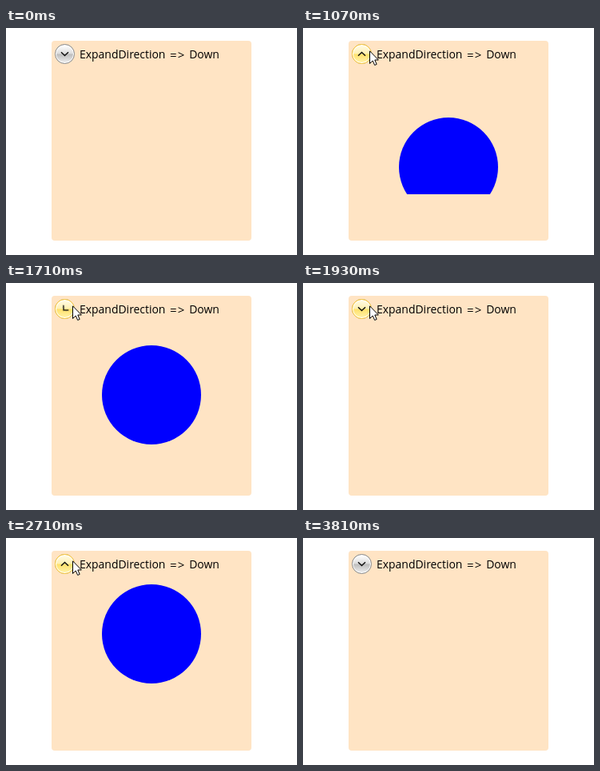
These frames come from a looping animation (364x284 px, 4.32 s). An HTML page:

```html
<!DOCTYPE html>
<html lang="en">
<head>
<meta charset="utf-8">
<title>Expander</title>
<style>
  :root { --loop: 4320ms linear infinite both; }
  html, body { margin: 0; width: 100%; height: 100%; overflow: hidden; background: #fff; }
  .stage { position: relative; width: 364px; height: 284px; overflow: hidden; }
  .panel {
    position: absolute; left: 57px; top: 16px; width: 250px; height: 250px;
    border-radius: 4px; background: #ffe4c4;
  }
  .view {
    position: absolute; left: 120px; width: 124px; overflow: hidden;
    animation: expand var(--loop);
  }
  .ball { width: 124px; height: 124px; border-radius: 50%; background: #00f; }
  svg { position: absolute; left: 0; top: 0; }
  text { font-family: "Open Sans", "Noto Sans", sans-serif; font-size: 13.95px; }
  .arrow { font-size: 15px; }
  .hover { animation: hover var(--loop); }
  .chevron { transform-origin: 73.5px 32.5px; animation: turn var(--loop); }
  .press { animation: press 4320ms step-end infinite both; }
  .cursor { animation: move var(--loop), show 4320ms step-end infinite both; }

  /* The view shrinks towards its middle; the ball stays at its top edge. */
  @keyframes expand {
    0% { top: 160px; height: 0; }
    18.403% { top: 160px; height: 0; animation-timing-function: cubic-bezier(.333, 0, .667, .167); }
    27.083% { top: 58px; height: 204px; }
    35.648% { top: 58px; height: 204px; animation-timing-function: cubic-bezier(.333, 0, .667, .333); }
    44.56% { top: 160px; height: 0; }
    54.051% { top: 160px; height: 0; animation-timing-function: cubic-bezier(.333, 0, .667, .167); }
    62.731% { top: 58px; height: 204px; }
    72.014% { top: 58px; height: 204px; animation-timing-function: cubic-bezier(.333, 0, .667, .333); }
    80.926%, 100% { top: 160px; height: 0; }
  }
  @keyframes turn {
    0%, 18.403%, 40.903%, 54.051%, 77.269%, 100% { transform: rotate(0deg); }
    23.495%, 35.648%, 59.144%, 72.014% { transform: rotate(180deg); }
  }
  @keyframes hover {
    0%, 9.722%, 80.556%, 100% { opacity: 0; }
    11.574%, 77.083% { opacity: 1; }
  }
  @keyframes press {
    0%, 18.287%, 35.648%, 54.051%, 72.014%, 100% { opacity: 0; }
    16.435%, 33.796%, 52.315%, 70.37% { opacity: 1; }
  }
  @keyframes move {
    0%, 1.852% { transform: translate(310px, 274px); animation-timing-function: ease-in-out; }
    10.648% { transform: translate(83px, 28px); }
    76.157% { transform: translate(83px, 28px); animation-timing-function: cubic-bezier(.333, 0, .667, .333); }
    82.176% { transform: translate(264px, 211px); }
    82.87% { transform: translate(264px, 211px); animation-timing-function: ease-out; }
    88.194%, 100% { transform: translate(306px, 286px); }
  }
  @keyframes show {
    0%, 88.194%, 100% { opacity: 0; }
    1.852% { opacity: 1; }
  }
</style>
</head>
<body>
<div class="stage">
  <div class="panel"></div>
  <div class="view"><div class="ball"></div></div>
  <svg width="364" height="284" viewBox="0 0 364 284">
    <defs>
      <linearGradient id="grey" x2="0" y2="1">
        <stop offset="0" stop-color="#fff"/>
        <stop offset=".48" stop-color="#dcdcdc"/>
        <stop offset=".52" stop-color="#bcbcbc"/>
        <stop offset="1" stop-color="#ededed"/>
      </linearGradient>
      <linearGradient id="gold" x2="0" y2="1">
        <stop offset="0" stop-color="#fffbe6"/>
        <stop offset=".48" stop-color="#fff0b0"/>
        <stop offset=".52" stop-color="#ffe16a"/>
        <stop offset="1" stop-color="#fff2a8"/>
      </linearGradient>
    </defs>
    <text y="38">
      <tspan x="92">ExpandDirection</tspan><tspan class="arrow" x="205 214.8" y="38.6">=&gt;</tspan><tspan x="229.2" y="38">Down</tspan>
    </text>
    <g>
      <circle cx="73.5" cy="32.5" r="12" fill="#fff" stroke="#848484"/>
      <circle cx="73.5" cy="32.5" r="10.5" fill="url(#grey)"/>
    </g>
    <g class="hover">
      <circle cx="73.5" cy="32.5" r="12" fill="#fff" stroke="#ffc92b"/>
      <circle cx="73.5" cy="32.5" r="10.5" fill="url(#gold)"/>
    </g>
    <path class="chevron" d="M69 30.3L73.5 34.5L78 30.3" fill="none" stroke="#111" stroke-width="1.5"/>
    <circle class="press" cx="84" cy="28" r="15" fill="#ff0" fill-opacity=".47"/>
    <path class="cursor" d="M.5 .8V16.5L4.2 13L6.7 18.5L9.2 17.4L6.8 12H11.4Z" fill="#fff" stroke="#000"/>
  </svg>
</div>
</body>
</html>
```
